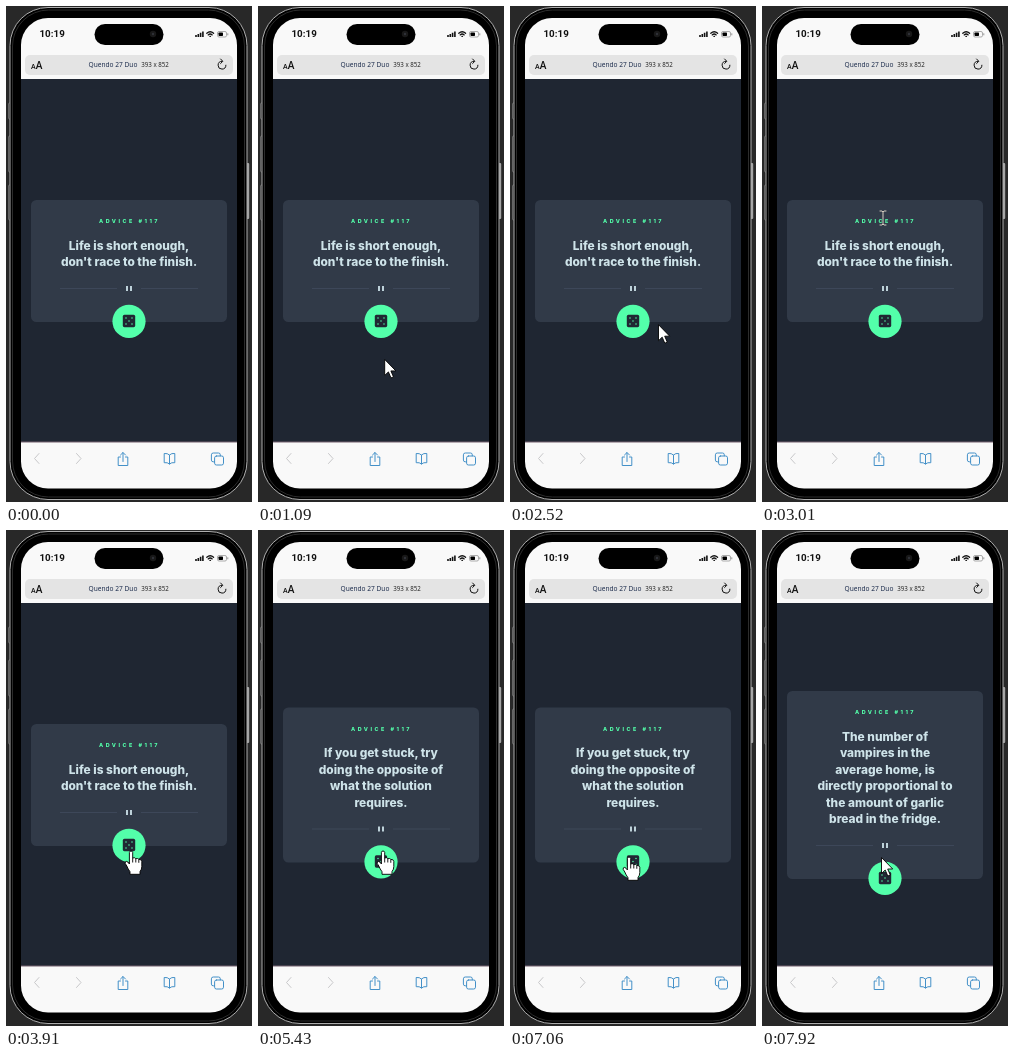
Recreate the animation shown at these times as an HTML page. Size 246x496 px, loop 8 s.

```html
<!DOCTYPE html>
<html lang="en">
<head>
<meta charset="utf-8">
<title>Advice generator</title>
<style>
html, body { margin: 0; width: 100%; height: 100%; overflow: hidden; background: #282828; }
svg { display: block; width: 246px; height: 496px; }
text { font-family: "Open Sans", sans-serif; fill: #111; }
.clock { font: 700 9.8px Roboto, sans-serif; }
.quote, .advice { font-family: Inter, sans-serif; font-weight: 800; text-anchor: middle; }
.quote { font-size: 11.9px; fill: #cee3e9; }
.advice { font-size: 5.4px; letter-spacing: 2.5px; fill: #53ffaa; }
.line { fill: none; stroke-linecap: round; stroke-linejoin: round; }
</style>
</head>
<body>
<svg viewBox="0 0 246 496">
  <!-- phone body -->
  <g fill="#1b1b1b" stroke="#777" stroke-width=".8">
    <rect x="2.5" y="97" width="4" height="16" rx="1"/>
    <rect x="2.5" y="130" width="4" height="36" rx="1"/>
    <rect x="2.5" y="179" width="4" height="35" rx="1"/>
  </g>
  <rect x="240" y="157" width="3.2" height="56" rx="1" fill="#a5a5a5"/>
  <rect x="4" y="1.5" width="237" height="492" rx="38" fill="#000" stroke="#adadad"/>
  <rect x="6.5" y="4" width="232" height="487" rx="36" fill="#000" stroke="#2c2c2c"/>
  <clipPath id="screen"><rect x="15" y="12" width="216" height="470.5" rx="27"/></clipPath>
  <g clip-path="url(#screen)">
    <rect width="246" height="496" fill="#f9f9f9"/>
    <rect y="73" width="246" height="363" fill="#1f2632"/>
    <rect y="435.5" width="246" height="1" fill="#75606f"/>
  </g>

  <!-- status bar -->
  <rect x="88.5" y="18" width="69" height="21" rx="10.5"/>
  <circle cx="147" cy="28" r="3.2" fill="#181818"/>
  <circle cx="147" cy="28" r="1.2" fill="#303238"/>
  <text class="clock" x="33.5" y="31.2">10:19</text>
  <path d="M190 31v-2M192.3 31v-3M194.6 31v-4.2M196.9 31v-5.5" stroke="#111" stroke-width="1.6"/>
  <path class="line" d="M200.8 27.3q3.4-3 6.8 0M202.2 28.9q2-1.8 4 0M203.9 30.3h.6" stroke="#111" stroke-width="1.3"/>
  <rect x="211.5" y="25.5" width="9" height="5.5" rx="1.5" fill="none" stroke="#999" stroke-width=".8"/>
  <rect x="212.5" y="26.5" width="4.5" height="3.5" rx=".7"/>
  <path d="M221.8 27.3v2" stroke="#999"/>

  <!-- address bar -->
  <rect x="19" y="49" width="208" height="20" rx="5" fill="#e4e4e4"/>
  <text x="25" y="63" font-size="7" font-weight="600">A<tspan font-size="10">A</tspan></text>
  <text x="107" y="61.3" font-size="6.6" text-anchor="middle" style="fill:#124">Quendo 27 Duo</text>
  <text x="149" y="61.3" font-size="6.2" text-anchor="middle" style="fill:#222">393 x 852</text>
  <path class="line" d="M216 55.3a3.9 3.9 0 1 0 3.9 3.9M214.6 53l2.2 2.3-2.2 2.2" stroke="#111"/>

  <!-- toolbar -->
  <g class="line" stroke="#4390c8">
    <path d="M33 447.5l-4.5 5 4.5 5M70.5 447.5l4.5 5-4.5 5" stroke="#c8c8ca"/>
    <path d="M114.5 451h-2.3v8.5h9.6v-8.5h-2.3M117 455.5v-8.8M114.5 449l2.5-2.5 2.5 2.5"/>
    <path d="M163.5 449q-2-2-5.3-1.5v9.2q3.3-.5 5.3 1.3 2-1.8 5.3-1.3v-9.2q-3.3-.5-5.3 1.5v9"/>
    <rect x="208.6" y="450" width="8.9" height="9" rx="1.8"/>
    <path d="M208.4 455.8h-1.1q-1.9 0-1.9-1.7v-5.3q0-1.8 1.9-1.8h5.2q1.8 0 1.8 1.8v1"/>
  </g>

  <!-- advice card -->
  <rect id="card" x="25" width="196" rx="5.5" fill="#313a48"/>
  <text id="advice" class="advice" x="123.5">ADVICE #117</text>
  <g id="quote"></g>
  <g id="divider">
    <path d="M54 0h57M135 0h57" stroke="#424e60" stroke-width=".7"/>
    <path d="M121 -2.5v5M125 -2.5v5" stroke="#cee3e9" stroke-width="1.8"/>
  </g>
  <g id="button">
    <circle cx="123" r="16.6" fill="#53ffaa"/>
    <rect x="116.8" y="-6.5" width="12.4" height="12.4" rx="1.6" fill="#202733"/>
    <path class="line" d="M120 -3.3h0M126 -3.3h0M123 -.3h0M120 2.7h0M126 2.7h0" stroke="#53ffaa" stroke-width="1.5"/>
  </g>

  <!-- pointer, with the hot spot at 0,0 -->
  <g id="pointer">
    <circle id="click" r="12" fill="#ff0" fill-opacity=".47"/>
    <path id="arrow" d="M.5 .5v16l3.7-3.5 2.6 6 2.5-1-2.6-6h5z" fill="#fff" stroke="#000" stroke-width=".9"/>
    <path id="beam" class="line" d="M-3 -7h2l1 1 1-1h2M0 -6v12M-3 7h2l1-1 1 1h2" stroke="#d6cec0"/>
    <path id="hand" d="M-1.6 13V1.5Q-1.5 0 0 0t1.7 1.5V7q1.8-1 3.1.7 1.7-.9 3 .7 2.7-.3 3 2v5.1q0 3-1.8 5v2.8H-1v-2.6Q-3 18-4.2 15l-1.6-2.6q-.4-2 1.5-2 1.4.4 2.7 2.6M1.7 7v4.5M4.8 8v3.5M7.8 8.8v3"
      fill="#fff" stroke="#000" stroke-width=".9" stroke-linejoin="round"/>
  </g>
</svg>

<script>
const $ = id => document.getElementById(id);
const LOOP = 8000, TICK = 70, MID = 255, LEAD = 16.5;

const quotes = [
  [0, "Life is short enough,|don't race to the finish."],
  [5430, "If you get stuck, try|doing the opposite of|what the solution|requires."],
  [7920, "The number of|vampires in the|average home, is|directly proportional to|the amount of garlic|bread in the fridge."]
];
const clicks = [[4770, 4830], [7520, 7650]];

// Eased move to x,y; the pointer only advances once per tick
const glide = (start, end, x, y) => ({ start, at(t, [px, py]) {
  const u = t >= end ? 1 : (Math.floor((t - start) / TICK) + 1) * TICK / (end - start + TICK);
  const e = 1 - (1 - u) ** 1.6;
  return [px + (x - px) * e, py + (y - py) * e];
} });

// Clockwise rounds about the card, at the top when t = 3010
const circle = (start, end) => ({ start, at(t) {
  const held = start + Math.floor((Math.min(t, end) - start) / TICK) * TICK;
  const a = (held - 3010) / 825 * 2 * Math.PI;
  return [121 + 48.5 * Math.sin(a), 270 - 58 * Math.cos(a)];
} });

const moves = [
  glide(740, 1360, 95, 305),
  glide(1690, 1690, 75, 297),
  circle(1890, 3360),
  glide(3430, 3500, 146, 286),
  glide(3570, 3910, 125, 321),
  glide(6090, 6450, 153, 308),
  glide(6850, 7060, 119, 327)
];

const pointerAt = t =>
  moves.filter(m => t >= m.start).reduce((pos, m) => m.at(t, pos), [235, 520]);

const half = count => 44.5 + count * LEAD / 2;
const shift = (id, x, y) => $(id).setAttribute("transform", `translate(${x} ${y})`);
const show = (id, on) => $(id).setAttribute("visibility", on ? "visible" : "hidden");

function layCard(lines) {
  const h = half(lines.length), top = MID - h, bottom = MID + h;
  $("card").setAttribute("y", top);
  $("card").setAttribute("height", 2 * h);
  $("advice").setAttribute("y", top + 23);
  $("quote").innerHTML = lines.map((line, i) =>
    `<text class="quote" x="123" y="${top + 49.6 + i * LEAD}">${line}</text>`).join("");
  shift("divider", 0, bottom - 33.5);
  shift("button", 0, bottom - .7);
}

function shapeAt([x, y], count) {
  const h = half(count), dx = Math.abs(x - 123), dy = y - (MID - h);
  if (Math.hypot(dx, y - MID - h) < 16.5) return "hand";
  const onLabel = dx < 30 && dy > 14 && dy < 26;
  const onQuote = dx < 69 && dy > 38 && dy < 38 + count * LEAD;
  return onLabel || onQuote ? "beam" : "arrow";
}

let shown;
function frame(now) {
  const t = now % LOOP;
  const quote = quotes.findLast(q => t >= q[0]);
  const lines = quote[1].split("|");
  if (quote !== shown) layCard(lines);
  shown = quote;

  const pos = pointerAt(t), shape = shapeAt(pos, lines.length);
  for (const id of ["arrow", "beam", "hand"]) show(id, id === shape);
  show("click", clicks.some(([from, to]) => t >= from && t < to));
  shift("pointer", ...pos);
  requestAnimationFrame(frame);
}
frame(0);
</script>
</body>
</html>
```
